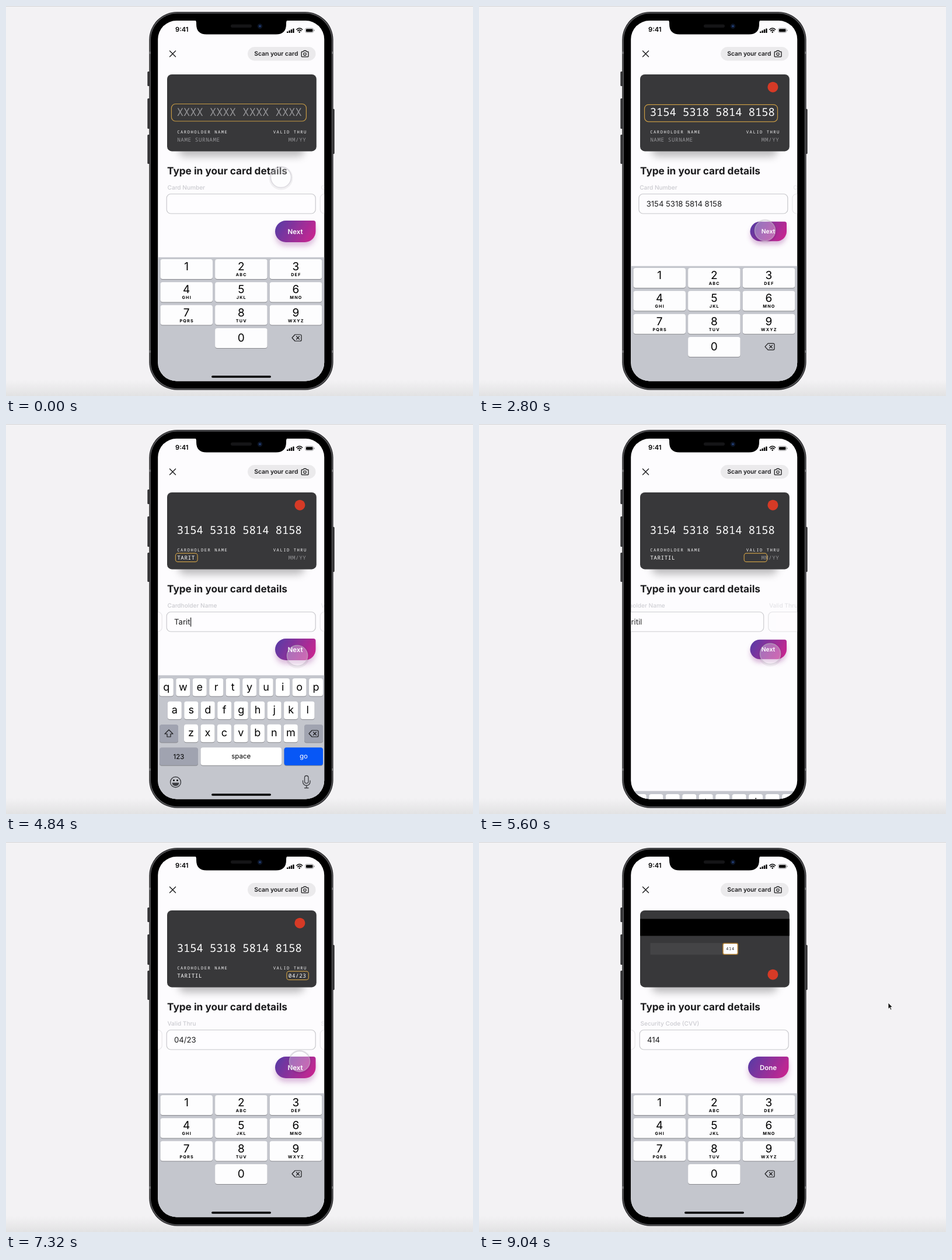
An HTML page that plays this animation: 800x667 px, repeating every 9.08 s.

```html
<!DOCTYPE html>
<html lang="en">
<head>
<meta charset="utf-8">
<title>Card details form</title>
<style>
  html, body { margin: 0; width: 100%; height: 100%; overflow: hidden; }
  body { position: relative; background: linear-gradient(#f3f2f4 640px, #e2e2e3 667px); }
  svg { position: absolute; left: 0; top: 0; overflow: visible; }
  text { font-family: Inter, sans-serif; white-space: pre; text-rendering: geometricPrecision; }
  .mono text { font-family: "Noto Sans Mono", "DejaVu Sans Mono", monospace; }
  #card { position: absolute; left: 275.6px; top: 117.3px; width: 255.8px; height: 131.4px; perspective: 800px; }
  #card svg { backface-visibility: hidden; }
  #shadow { position: absolute; left: 20px; top: 60px; width: 215px; height: 68px;
    border-radius: 10px; box-shadow: 0 12px 14px #0004; }
</style>
</head>
<body>
<svg id="phone" width="800" height="667"></svg>
<div id="card"><div id="shadow"></div></div>
<svg id="top" width="800" height="667"></svg>
<script>
const LOOP = 9080, PITCH = 263, KEYBOARD_MS = 215, KEYBOARD_DROP = 213;
const STEPS = [2745, 5442, 7354];
const INK = '#1b1b1d', GREY = '#949497', GOLD = '#c69a45';
const FIELDS = [
  { label: 'Card Number', value: '3154 5318 5814 8158', hint: 'XXXX XXXX XXXX XXXX', from: 560, to: 2420 },
  { label: 'Cardholder Name', value: 'Taritil', hint: 'NAME SURNAME', from: 3900, to: 5050 },
  { label: 'Valid Thru', value: '04/23', hint: 'MM/YY', from: 6150, to: 7000 },
  { label: 'Security Code (CVV)', value: '414', hint: 'XXX', from: 8000, to: 8600 }
];
const POINTER = [[0, 471, 293], [500, 485, 392], [2000, 488, 396], [2680, 490, 384], [2900, 490, 384],
  [3480, 499, 415], [3700, 500, 416], [5200, 499, 395], [5600, 499, 393], [6100, 502, 396],
  [7320, 503, 375], [7400, 503, 386], [8450, 503, 386], [8950, 701, 275], [9080, 701, 275]];

const $ = id => document.getElementById(id);
const clamp = v => Math.max(0, Math.min(1, v));
const ease = (v, n = 3) => (v = clamp(v)) < .5 ? (2 * v) ** n / 2 : 1 - (2 - 2 * v) ** n / 2;
const mix = (a, b, p) => a + (b - a) * p;

// Markup helpers
const rect = (x, y, w, h, r, fill, more = '') =>
  `<rect x="${x}" y="${y}" width="${w}" height="${h}" rx="${r}" fill="${fill}" ${more}/>`;
const text = (x, y, size, s, more = '') => `<text x="${x}" y="${y}" font-size="${size}" ${more}>${s}</text>`;
const mid = (x, y, size, s, more = '') => text(x, y, size, s, 'text-anchor="middle" ' + more);
const line = (d, color = INK, w = 1.3, more = '') =>
  `<path d="${d}" fill="none" stroke="${color}" stroke-width="${w}" stroke-linecap="round" stroke-linejoin="round" ${more}/>`;
const key = (x, y, w, h, fill = '#fff') => rect(x, y + 1, w, h, 4, '#898a8f') + rect(x, y, w, h, 4, fill);
const erase = (x, y) => line(`M${x - 8} ${y}l5-5.5h9q2 0 2 2v7q0 2-2 2h-9zM${x - .5} ${y - 2.5}l5 5m0-5l-5 5`, INK, 1.2);

function numberPad() {
  const subs = ['', 'ABC', 'DEF', 'GHI', 'JKL', 'MNO', 'PQRS', 'TUV', 'WXYZ'];
  let s = '';
  for (let i = 0; i < 10; i++) {
    const col = i < 9 ? i % 3 : 1, row = i < 9 ? i / 3 | 0 : 3;
    const x = 264.5 + col * 93.6, y = 433 + row * 39.3;
    s += key(x, y, 89.5, 34, '#fdfdfe') + mid(x + 44.7, y + (i < 9 ? 19 : 23), 19, (i + 1) % 10);
    if (subs[i]) s += mid(x + 45.2, y + 29, 7.2, subs[i], 'font-weight="700" letter-spacing="1.2"');
  }
  return s + erase(498, 567.5);
}

function letterPad() {
  const DARK = '#a0a3b0';
  let s = '';
  [['qwertyuiop', 262.8], ['asdfghjkl', 276.8], ['zxcvbnm', 305]].forEach(([row, x0], r) => {
    [...row].forEach((c, i) => {
      const x = x0 + i * 28.47, y = 435 + r * 39.4;
      s += key(x, y, 24, 30.5) + mid(x + 12, y + 20.5, 18, c);
    });
  });
  s += key(263, 514, 32, 30.5, DARK) + line('M279 523l7 7h-4v5h-6v-5h-4z', INK, 1.2);
  s += key(511, 514, 32, 30.5, DARK) + erase(527, 529.5);
  s += key(263, 553.3, 66, 30.5, DARK) + mid(296, 573, 11.5, '123');
  s += key(333.5, 553.3, 138.5, 30.5) + mid(402.7, 572, 11.5, 'space');
  s += key(476.5, 553.3, 66.5, 30.5, '#0757f6') + mid(510, 572, 11.5, 'go', 'fill="#fff"');
  s += '<circle cx="290.5" cy="612.5" r="9" fill="none" stroke="#3c3d42" stroke-width="1.4"/>'
    + '<path d="M284.5 613.5h12a6 5.5 0 0 1-12 0z" fill="#3c3d42"/><circle cx="287.5" cy="609.5" r="1.4"/><circle cx="293.5" cy="609.5" r="1.4"/>';
  s += rect(511.5, 601.5, 6.5, 13, 3.2, 'none', 'stroke="#3c3d42" stroke-width="1.3"')
    + line('M508.5 610v2a6.25 6.25 0 0 0 12.5 0v-2M514.8 618.5v4M511.5 622.5h6.5', '#3c3d42');
  return s;
}

const field = (f, i) => `<g id="field${i}" transform="translate(${i * PITCH})">`
  + text(276.5, 313.8, 10.1, f.label, 'font-weight="500" fill="#cbcbd0"')
  + rect(275.2, 321.5, 255, 33.5, 7, '#fefdff', 'stroke="#c8c8cc" stroke-width="1.2"')
  + text(288, 343, 13.15, '', `id="value${i}" fill="${INK}"`) + '</g>';

$('phone').innerHTML = `<defs>
  <clipPath id="screen">${rect(260.2, 25, 285, 616.5, 32, '#fff')}</clipPath>
  <linearGradient id="violet" x1="0" y1=".35" x2="1" y2=".65"><stop stop-color="#5e3aa4"/><stop offset="1" stop-color="#c72690"/></linearGradient>
  <filter id="glow" x="-30%" y="-30%" width="160%" height="200%"><feDropShadow dx="0" dy="7" stdDeviation="4" flood-color="#9a3a98" flood-opacity=".32"/></filter>
</defs>`
  + rect(0, 0, 800, 1, 0, '#d4d4d6')
  + [[242.3, 112, 25], [242.3, 158, 52], [242.3, 220, 50], [558.5, 176, 77]].map(([x, y, h]) => rect(x, y, 4.2, h, 1.5, '#353537')).join('')
  + rect(245.2, 10, 315.4, 646.7, 48, '#2c2c2e')
  + rect(246.5, 11.3, 312.8, 644.1, 47, '#5a5a5d')
  + rect(248, 12.8, 309.8, 641.1, 45.5, '#000')
  + [78, 589].map(y => rect(245.5, y, 2.5, 4, 0, '#77777a') + rect(558, y, 2.5, 4, 0, '#77777a')).join('')
  + `<g clip-path="url(#screen)">` + rect(260, 25, 286, 617, 0, '#fdfcfe')
  + text(290, 44, 11.2, '9:41', 'font-weight="600"')
  + [0, 1, 2, 3].map(i => rect(481 + i * 3.4, 43.5 - i * 1.7, 2.4, 2.6 + i * 1.7, .6, '#000')).join('')
  + line('M497.8 40.2q4.9-4.4 9.8 0M499.7 42.4q3-2.5 6 0', '#000', 1.5) + '<circle cx="502.7" cy="44.6" r="1.3"/>'
  + rect(512.8, 38, 13.8, 7.4, 2.2, 'none', 'stroke="#8c8c8e" stroke-width=".8"') + rect(514, 39.2, 11.4, 5, 1.2, '#000') + rect(527.4, 40.3, 1.2, 2.8, .6, '#8c8c8e')
  + line('M280.5 76.8l10 10m0-10l-10 10', INK, 1.4)
  + rect(414, 70, 116.5, 23.5, 11.75, '#ebeaec') + text(425.3, 85.2, 10.3, 'Scan your card', `font-weight="600" fill="${INK}"`)
  + line('M507 78.2h2l1.2-1.7h3.8l1.2 1.7h2q.8 0 .8 .8v7q0 .8-.8 .8h-10.2q-.8 0-.8-.8v-7q0-.8 .8-.8z') + '<circle cx="512" cy="82.2" r="2.2" fill="none" stroke="#1b1b1d" stroke-width="1.2"/>'
  + text(276, 287.8, 17.22, 'Type in your card details', `font-weight="700" fill="${INK}"`)
  + `<g id="fields">${FIELDS.map(field).join('')}</g>`
  + rect(0, 331, 1.2, 15.5, 0, INK, 'id="caret"')
  + `<g id="button"><path d="M479.5 367h47q4 0 4 4v14.5a18.5 18.5 0 0 1-18.5 18.5h-32.5a18.5 18.5 0 0 1 0-37z" fill="url(#violet)" filter="url(#glow)"/>`
  + mid(495.5, 389.5, 11.5, '', 'id="action" font-weight="600" fill="#fff"') + '</g>'
  + `<g id="keyboard">${rect(260, 429.7, 286, 240, 0, '#c4c6cd')}<g id="numbers">${numberPad()}</g><g id="letters">${letterPad()}</g>`
  + rect(352, 632.2, 102, 3.6, 1.8, '#000') + '</g></g>'
  + '<path d="M322 24q4 0 4 5v2q0 17.5 17.5 17.5h119q17.5 0 17.5-17.5v-2q0-5 4-5z"/>'
  + rect(385, 31.5, 36, 5.5, 2.7, '#151517') + '<circle cx="435" cy="34.5" r="4.2" fill="#0d1628"/><circle cx="435" cy="34.5" r="1.7" fill="#24427c"/>';

// Card faces use the card's own coordinates
const face = (id, body) => `<svg id="${id}" class="mono" width="255.8" height="131.4">${rect(0, 0, 255.8, 131.4, 8, '#38383a')}${body}</svg>`;
const badge = (y, id) => `<circle id="${id}" cx="227.4" cy="${y}" r="9" fill="#d63a26"/>`;
const caps = (x, s) => text(x, 101, 7.2, s, 'fill="#f2f2f3" letter-spacing="1.5"');
$('card').insertAdjacentHTML('beforeend',
  face('front', badge(21.7, 'badge')
    + text(16.7, 70.6, 18.8, '', 'id="print0" font-weight="300"')
    + caps(17.2, 'CARDHOLDER NAME') + caps(181.8, 'VALID THRU')
    + text(17.2, 114.5, 9.3, '', 'id="print1" letter-spacing=".55"')
    + text(207.8, 114.5, 9.3, '', 'id="print2" letter-spacing=".55"')
    + rect(0, 0, 0, 0, 0, 'none', `id="focus" stroke="${GOLD}" stroke-width="1.2"`))
  + face('back', rect(0, 14.5, 255.8, 29, 0, '#000') + rect(17.4, 55.7, 124, 20, 0, '#444446')
    + rect(141.9, 56.2, 25.5, 19, 2.5, '#fff', 'stroke="#a9792f" stroke-width="1.6"')
    + text(147.2, 68, 7, '', 'id="print3" letter-spacing=".7"') + badge(109.7, 'badge2')));

$('top').innerHTML = `<g id="touch"><circle r="19" cy="1" fill="none" stroke="#0000000d" stroke-width="3"/>
  <circle r="17.6" fill="#ffffff4d" stroke="#c4c0c88c" stroke-width="1.6"/></g>
  <path id="arrow" d="M0 0v10.5l2.4-2.2 1.7 3.9 1.8-.8-1.7-3.8h3.2z" fill="#111" stroke="#fff" stroke-width=".8"/>`;

const set = (id, attrs) => { for (const k in attrs) $(id).setAttribute(k, attrs[k]); };
const typed = (f, t) => f.value.slice(0, Math.max(0, Math.floor((t - f.from) / (f.to - f.from) * (f.value.length - 1)) + 1));

function drawFields(t, step) {
  const shift = STEPS.reduce((sum, s) => sum + ease((t - s - 8) / 440), 0);
  set('fields', { transform: `translate(${-shift * PITCH})` });
  FIELDS.forEach((f, i) => {
    const s = typed(f, t), on = i == 3 ? '#222' : '#fff', off = i == 3 ? '#999' : GREY;
    const rest = i == 1 && s ? '' : f.hint.slice(s.length);
    $('value' + i).textContent = s;
    $('print' + i).innerHTML = `<tspan fill="${on}">${s.toUpperCase()}</tspan><tspan fill="${off}">${rest}</tspan>`;
    set('field' + i, { opacity: 1 - .6 * Math.min(1, Math.abs(i - shift)) });
  });
  const settled = !STEPS.some(s => t >= s && t < s + 380);
  const blink = (t - 7495 + 10000) % 1000 < 500;
  set('caret', { x: 288.5 + $('value' + step).getComputedTextLength(), opacity: settled && blink ? 1 : 0 });
}

function drawFocus(t) {
  const name = typed(FIELDS[1], t).length;
  const boxes = [[7.4, 50.5, 231, 29.5, 7], [14.4, 104.2, name ? 7 + name * 6.15 : 79.5, 14.5, 4], [204.9, 104.2, 37.5, 14.5, 4]];
  const a = ease((t - STEPS[0]) / 250, 4), b = ease((t - STEPS[1]) / 250, 4);
  const [x, y, width, height, rx] = boxes[0].map((v, i) => mix(mix(v, boxes[1][i], a), boxes[2][i], b));
  set('focus', { x, y, width, height, rx });
}

function drawKeyboard(t, step) {
  const e = step ? (t - STEPS[step - 1]) / KEYBOARD_MS : 2;
  const off = e < 1 ? ease(e) : 1 - ease(e - 1);
  const letters = (e < 1 ? step - 1 : step) == 1;
  set('keyboard', { transform: `translate(0 ${off * KEYBOARD_DROP})` });
  set('letters', { visibility: letters ? 'visible' : 'hidden' });
  set('numbers', { visibility: letters ? 'hidden' : 'visible' });
}

function drawButton(t) {
  const press = STEPS.reduce((sum, s) => sum + ease((t - s + 30) / 60) - ease((t - s - 180) / 120), 0);
  set('button', { transform: `translate(495.5 385.5) scale(${1 - .1 * press}) translate(-495.5 -385.5)` });
  $('action').textContent = t < STEPS[2] + 100 ? 'Next' : 'Done';
}

function drawPointer(t) {
  const i = Math.max(1, POINTER.findIndex(p => p[0] > t)), a = POINTER[i - 1], b = POINTER[i];
  const p = ease((t - a[0]) / (b[0] - a[0])), x = mix(a[1], b[1], p), y = mix(a[2], b[2], p);
  for (const [id, show] of [['touch', x < 562], ['arrow', x >= 562]])
    set(id, { transform: `translate(${x} ${y})`, visibility: show ? 'visible' : 'hidden' });
}

function draw(t) {
  const step = STEPS.filter(s => t >= s).length;
  drawFields(t, step);
  drawFocus(t);
  drawKeyboard(t, step);
  drawButton(t);
  drawPointer(t);
  set('badge', { opacity: clamp((t - 1000) / 200) });
  const turn = 180 * ease((t - STEPS[2]) / 250);
  $('front').style.transform = `rotateY(${turn}deg)`;
  $('back').style.transform = `rotateY(${turn - 180}deg)`;
}

const start = performance.now();
function frame() {
  draw((performance.now() - start) % LOOP);
  requestAnimationFrame(frame);
}
frame();
</script>
</body>
</html>
```
